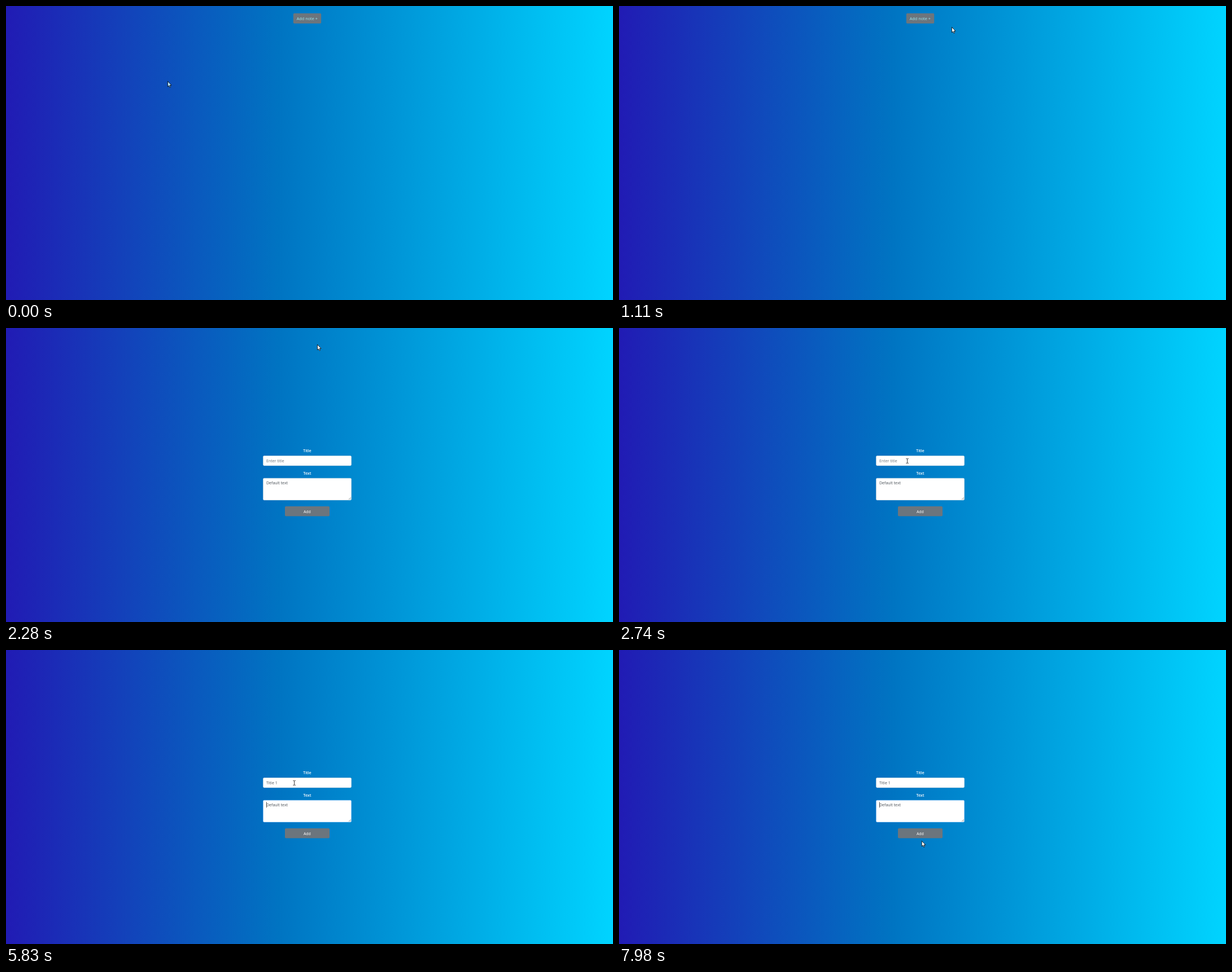
Animation, 1075 px wide and 521 px high, one loop 8000 ms. Source, as an HTML page:

```html
<!DOCTYPE html>
<html lang="en">
<head>
<meta charset="utf-8">
<title>Add a note</title>
<style>
  html, body { margin: 0; width: 100%; height: 100%; overflow: hidden; }
  svg { display: block; width: 1075px; height: 521px;
    background: linear-gradient(90deg, #211bb4, #0074c2 45%, #00d4ff); }
  text { font: 7px "Open Sans", "Noto Sans", sans-serif; fill: #495057; white-space: pre; }
  .mid { text-anchor: middle; fill: #fff; }
  .label { font-weight: 600; font-size: 6.9px; }
  .field { fill: #fff; stroke: #ced4da; stroke-width: .5; }
  .button { fill: #6c757d; }
  .pointer { stroke: #000; stroke-width: .8; stroke-linejoin: round; }
</style>
</head>
<body>
<svg viewBox="0 0 1075 521">
  <g id="start">
    <rect id="addNote" class="button" x="508.8" y="13" width="49.4" height="18" rx="1.8"/>
    <text id="addNoteText" class="mid" x="533.3" y="24.6" style="font-size:7.35px">Add note +</text>
  </g>
  <g id="form">
    <text class="mid label" x="533.5" y="220.3">Title</text>
    <rect id="titleField" class="field" x="455.4" y="226.5" width="156.2" height="17.4" rx="1.8"/>
    <text id="titleText" x="461" y="238.4"></text>
    <text class="mid label" x="533.5" y="259.6">Text</text>
    <rect id="textField" class="field" x="455.4" y="266.2" width="156.2" height="38.8" rx="1.8"/>
    <text x="461" y="277.4">Default text</text>
    <path d="M606.8 304L610.8 300M609 304L610.8 302.2" stroke="#666" stroke-width=".6"/>
    <rect class="button" x="494" y="316" width="79" height="17.6" rx="1.8"/>
    <text class="mid" x="533.4" y="327.9">Add</text>
    <rect id="caret" width=".8" height="10" fill="#333"/>
  </g>
  <circle id="click" r="7" fill="#ff0" fill-opacity=".5"/>
  <g id="cursor">
    <path id="arrow" class="pointer" fill="#fff" d="M.4 .4V10L2.5 8 4 11.3 5.5 10.6 4.1 7.4H7Z"/>
    <path id="hand" class="pointer" fill="#fff" d="M-1 1.2Q0-.6 1 1.2V5.2L5.2 6.3Q6.2 6.6 6 8.5L5 13H-.2L-3.6 8.8Q-4 7.4-2.6 7.5L-1 8.8Z"/>
    <path id="beam" fill="none" stroke="#222" stroke-width=".9" d="M-2.2-4H-.6L0-3.5 .6-4H2.2M0-3.5V3.5M-2.2 4H-.6L0 3.5 .6 4H2.2"/>
  </g>
</svg>
<script>
const LOOP = 8000;
const $ = id => document.getElementById(id);
const show = (id, on) => $(id).setAttribute("visibility", on ? "inherit" : "hidden");
const between = (v, a, b) => v >= a && v < b;

// Mouse moves: start, end, number of steps, Bezier points
const moves = [
  [290, 1080, 18, [[286, 133], [360, 110], [560, 90], [591, 48]]],
  [1110, 1620, 11, [[589, 37], [582, 34], [566, 29], [550.5, 25]]],
  [2280, 2740, 11, [[550, 25], [566, 80], [556, 190], [510.6, 235.6]]],
  [7410, 7980, 12, [[510.6, 235.6], [560, 250], [612, 352], [535.8, 338]]]
];
// Typed characters: time, text so far
const typed = [[3990, "T"], [4350, "Ti"], [4460, "Tit"], [4570, "Titl"],
  [4680, "Title"], [5280, "Title "], [5370, "Title 1"]];
// Times at which the caret starts a fresh blink
const caretResets = [2970, ...typed.map(k => k[0]), 5830];

function bezier(points, p) {
  while (points.length > 1)
    points = points.slice(1).map((b, i) => b.map((v, j) => points[i][j] + (v - points[i][j]) * p));
  return points[0];
}

function mouseAt(t) {
  const [start, end, steps, points] = moves.filter(m => t >= m[0]).pop() || moves[0];
  if (t < start) return points[0];
  const step = Math.floor((t - start) / (end - start) * (steps - 1) + 1e-6);
  const first = start === 1110 ? 0 : 1;
  const p = Math.min(1, (step + first) / (steps - 1 + first));
  return bezier(points, p * p * (3 - 2 * p));
}

function cursorKind(x, y, form) {
  if (!form) return between(x, 509, 558) && between(y, 13, 31) ? "hand" : "arrow";
  if (between(x, 455, 612) && (between(y, 226, 244) || between(y, 266, 305))) return "beam";
  return between(x, 494, 573) && between(y, 316, 334) ? "hand" : "arrow";
}

function draw(t) {
  const form = t >= 2080;
  const [x, y] = mouseAt(t);
  const kind = cursorKind(x, y, form);
  show("start", !form);
  show("form", form);
  for (const id of ["arrow", "hand", "beam"]) show(id, id === kind);
  $("cursor").setAttribute("transform", `translate(${x} ${y})`);
  $("arrow").style.fill = t < 290 ? "#b5e5ff" : "#fff";
  $("addNoteText").style.fill = kind === "hand" ? "#fff" : "#9eeaf3";
  $("addNote").style.fill = t >= 2000 ? "#5a6268" : "#6c757d";

  show("click", between(t, 2000, 2080) || between(t, 2970, 3050));
  $("click").setAttribute("cx", x);
  $("click").setAttribute("cy", y);

  const entry = typed.filter(k => t >= k[0]).pop();
  const title = $("titleText");
  title.textContent = entry ? entry[1] : "Enter title";
  title.style.fill = entry ? "#495057" : "#6c757d";
  const inTitle = between(t, 2970, 5830), inText = t >= 5830;
  $("titleField").style.stroke = inTitle ? "#80bdff" : "#ced4da";
  $("textField").style.stroke = inText ? "#80bdff" : "#ced4da";

  const reset = caretResets.filter(r => t >= r).pop();
  const blinkOn = Math.floor((t - reset) / 510) % 2 === 0;
  show("caret", form && (inTitle || inText) && blinkOn);
  $("caret").setAttribute("x", 461 + (inTitle && entry ? title.getComputedTextLength() : 0));
  $("caret").setAttribute("y", inText ? 269.3 : 230.5);
}

const origin = performance.now();
function tick() {
  draw((performance.now() - origin) % LOOP);
  requestAnimationFrame(tick);
}
tick();
</script>
</body>
</html>
```
